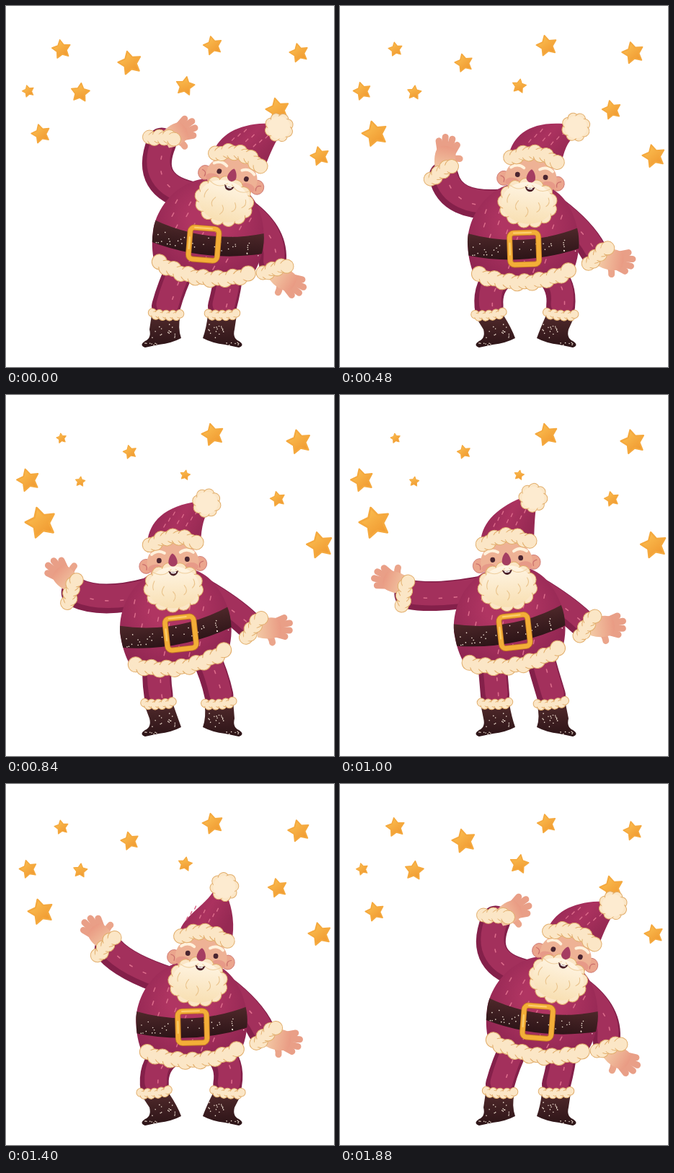
Recreate the animation shown at these times as an HTML page. Size 455 by 500 pixels, loop 1.92 s.

```html
<!DOCTYPE html>
<html lang="en">
<head>
<meta charset="utf-8">
<title>Waving Santa</title>
<style>
  html, body { margin: 0; width: 100%; height: 100%; overflow: hidden; background: #fff; }
  svg { display: block; width: 100%; height: 100%; }
</style>
</head>
<body>
<svg id="stage" viewBox="0 0 455 500" xmlns="http://www.w3.org/2000/svg">
  <defs>
    <linearGradient id="gold" x1="0" y1="0" x2=".5" y2="1">
      <stop offset="0" stop-color="#fcc355"/><stop offset="1" stop-color="#f19c33"/>
    </linearGradient>
    <radialGradient id="coat" cx=".5" cy=".42" r=".62">
      <stop offset=".3" stop-color="#b03562"/><stop offset="1" stop-color="#8f2551"/>
    </radialGradient>
    <linearGradient id="hatTone" x1="0" y1="0" x2="1" y2=".4">
      <stop offset="0" stop-color="#8f2551"/><stop offset=".6" stop-color="#ab325f"/><stop offset="1" stop-color="#962953"/>
    </linearGradient>
    <linearGradient id="skin" x1="0" y1="0" x2="1" y2="0">
      <stop offset="0" stop-color="#f3c9a4"/><stop offset="1" stop-color="#e99a83"/>
    </linearGradient>
    <linearGradient id="leather" x1="0" y1="0" x2="0" y2="1">
      <stop offset="0" stop-color="#50292b"/><stop offset="1" stop-color="#2c1417"/>
    </linearGradient>
    <linearGradient id="beardTone" x1="0" y1="0" x2="0" y2="1">
      <stop offset="0" stop-color="#fff5e4"/><stop offset="1" stop-color="#f8dfb2"/>
    </linearGradient>
  </defs>
</svg>
<script>
const LOOP = 1920, STEP = 40;
const TIMES = [0, 280, 680, 1000, 1200, 1600, 1880];
const CREAM = '#fbe6c6', FUR_EDGE = '#e2ae6c', COAT = '#a3305c', SHADE = '#84204a', FLECK = '#dc6c8b';
const stage = document.getElementById('stage');

function add(parent, tag, attrs = {}) {
  const node = document.createElementNS('http://www.w3.org/2000/svg', tag);
  set(node, attrs);
  parent.appendChild(node);
  return node;
}
function set(node, attrs) {
  for (const name in attrs) node.setAttribute(name, attrs[name]);
}
const group = parent => add(parent, 'g');
const shape = (parent, d, fill, extra) => add(parent, 'path', { d, fill, ...extra });
const line = (parent, d, stroke, width) =>
  add(parent, 'path', { d, fill: 'none', stroke, 'stroke-width': width, 'stroke-linecap': 'round' });
const oval = (parent, cx, cy, rx, ry, fill, extra) =>
  add(parent, 'ellipse', { cx, cy, rx, ry, fill, ...extra });
const place = (node, x, y, angle = 0) =>
  node.setAttribute('transform', `translate(${x} ${y}) rotate(${angle})`);

let seed = 7;
const random = () => (seed = seed * 16807 % 2147483647) / 2147483647;

// Periodic cubic curve through one value per key time; the loop closes on the first value.
function track(...values) {
  values.push(values[0]);
  const n = values.length;
  const at = i => TIMES[(i + n) % n] + LOOP * Math.floor(i / n);
  const val = i => values[(i + n) % n];
  const slope = i => (val(i + 1) - val(i)) / (at(i + 1) - at(i));
  const tangent = i => {
    const before = at(i) - at(i - 1), after = at(i + 1) - at(i);
    return (slope(i - 1) * after + slope(i) * before) / (before + after);
  };
  return t => {
    let i = n - 1;
    while (at(i) > t) i--;
    const h = at(i + 1) - at(i), u = (t - at(i)) / h, w = 1 - u;
    return val(i) * w * w * (1 + 2 * u) + val(i + 1) * u * u * (3 - 2 * u)
      + h * u * w * (tangent(i) * w - tangent(i + 1) * u);
  };
}

function turn(x, y, angle) {
  const a = angle * Math.PI / 180, c = Math.cos(a), s = Math.sin(a);
  return [x * c - y * s, x * s + y * c];
}

// Scalloped band along a quadratic curve.
function fur(parent, [x0, y0, cx, cy, x1, y1], count, r) {
  for (let i = 0; i < count; i++) {
    const u = i / (count - 1), w = 1 - u;
    add(parent, 'circle', {
      cx: w * w * x0 + 2 * u * w * cx + u * u * x1,
      cy: w * w * y0 + 2 * u * w * cy + u * u * y1 + (i % 2 ? 1.5 : -1.5),
      r, fill: CREAM, stroke: FUR_EDGE, 'stroke-width': 1
    });
  }
  line(parent, `M${x0} ${y0}Q${cx} ${cy} ${x1} ${y1}`, CREAM, r * .95);
}
// Scalloped blob around an ellipse.
function cloud(parent, x, y, rx, ry, count, r, fill) {
  for (let i = 0; i < count; i++) {
    const a = i / count * 2 * Math.PI + .2;
    add(parent, 'circle', { cx: x + rx * Math.cos(a), cy: y + ry * Math.sin(a), r, fill: CREAM, stroke: FUR_EDGE });
  }
  oval(parent, x, y, rx + r * .4, ry + r * .4, fill);
}
function specks(parent, count, x, y, w, h) {
  for (let i = 0; i < count; i++)
    oval(parent, x + w * random(), y + h * random(), .8, .8, '#f6e6d8');
}

function makeLimb(width) {
  const g = group(stage);
  const base = line(g, '', SHADE, width);
  const top = line(g, '', COAT, width - 9);
  const flecks = line(g, '', FLECK, 1.6);
  top.setAttribute('transform', 'translate(2 -3)');
  set(flecks, { 'stroke-dasharray': '4 17', transform: 'translate(5 3)' });
  return d => [base, top, flecks].forEach(p => p.setAttribute('d', d));
}
function makeHand() {
  const g = group(stage);
  const fingers = [[13, -13], [20, -5], [19, 5], [12, 13]];
  for (const [x, y] of fingers) line(g, `M-6 ${y * .5}L${x} ${y}`, '#e99f87', 9);
  line(g, 'M-12 6Q-6 14-6 20', '#eba58b', 9);
  shape(g, 'M-26-11Q-6-18 5-12Q11 0 5 12Q-10 17-26 11Z', 'url(#skin)');
  return g;
}
function makeCuff() {
  const g = group(stage);
  fur(g, [-17, 0, 0, -2, 17, 0], 6, 9.5);
  return g;
}

// Stars: x, y, tilt, radius at the right pose, radius at the left pose.
const stars = [
  [77, 60, -10, 14, 7.5], [172, 79, -14, 17.5, 10], [287, 55, -14, 14, 16.5], [406.5, 65, -14, 14, 18],
  [31, 118, -16, 9, 17], [103, 120, 6, 14, 7.5], [248.5, 111, 10, 14, 7.5], [377, 144, -14, 17.5, 11],
  [48.5, 177, -16, 14, 23], [435.5, 208, -14, 14, 19.5]
].map(([x, y, tilt, from, to]) => {
  const points = Array.from({ length: 10 }, (_, i) => turn(0, i % 2 ? -.5 : -.95, i * 36));
  const node = add(stage, 'polygon', {
    points: points.join(' '), fill: 'url(#gold)', stroke: '#f5a93e', 'stroke-width': .12, 'stroke-linejoin': 'round'
  });
  return p => node.setAttribute('transform',
    `translate(${x} ${y}) rotate(${tilt}) scale(${from + (to - from) * p})`);
});

// Arms
const waveArm = makeLimb(41), waveHand = makeHand(), waveCuff = makeCuff();
const restArm = makeLimb(38), restHand = makeHand(), restCuff = makeCuff();

// Legs and boots
function makeLeg(mirrored) {
  const limb = makeLimb(40);
  const foot = group(stage);
  if (mirrored) foot.setAttribute('transform', 'translate(516 0) scale(-1 1)');
  const boot = shape(foot, '', 'url(#leather)');
  specks(foot, 16, 203, 440, 34, 21);
  specks(foot, 7, 192, 466, 18, 4);
  const cuff = group(stage);
  fur(cuff, [-19, 0, 0, 3, 19, 0], 9, 5.8);
  return (hipX, hipY, x, bend, tilt) => {
    limb(`M${hipX} ${hipY}Q${(x + hipX) / 2 + bend} 388 ${x} 416`);
    const bx = mirrored ? 516 - x : x;
    boot.setAttribute('d', `M${bx - 20} 428L${bx + 20} 428Q238 446 243 460Q230 467 212 469L193 473`
      + `Q184 470 193 464Q202 460 199 448Z`);
    place(cuff, x, 427, tilt);
  };
}
const leftLeg = makeLeg(false), rightLeg = makeLeg(true);

// Torso, with its origin in the middle of the belt
const torso = group(stage);
const TORSO = 'M-38-70C-62-55-78-25-78 2C-78 22-74 36-70 46Q0 70 66 46C74 30 78 10 76-8C72-40 58-62 40-72C15-85-15-85-38-70Z';
shape(add(torso, 'clipPath', { id: 'torsoClip' }), TORSO, '#000');
shape(torso, TORSO, 'url(#coat)');
for (let i = 0; i < 34; i++) {
  const a = i * 2.4, r = Math.sqrt((i + .5) / 34);
  const x = 66 * r * Math.cos(a), y = -8 + 54 * r * Math.sin(a);
  line(torso, `M${x} ${y}l2-5`, FLECK, 1.5);
}
const belt = group(torso);
belt.setAttribute('clip-path', 'url(#torsoClip)');
shape(belt, 'M-80-15Q0 12 80-16L80 13Q0 36-80 16Z', 'url(#leather)');
specks(belt, 34, -72, 1, 144, 17);
const buckle = group(torso);
const frame = { x: -20, y: -22, width: 40, height: 44, rx: 6, fill: 'none' };
add(buckle, 'rect', { ...frame, stroke: '#c37a22', 'stroke-width': 8 });
add(buckle, 'rect', { ...frame, stroke: '#f3ae38', 'stroke-width': 6.2 });
line(buckle, 'M-14-22L10-22M-20-8L-20 8', '#fcd06f', 2);
fur(torso, [-64, 44, -1, 70, 60, 45], 13, 10.5);

// Head, with its origin between the ears
const head = group(stage);
const hat = shape(head, '', 'url(#hatTone)');
const hatFlecks = group(head);
for (let i = 0; i < 8; i++)
  line(hatFlecks, `M${-16 + i * 6.2} ${-50 - (i * 7 % 5) * 4}l2-4`, FLECK, 1.4);
for (const side of [-1, 1]) {
  oval(head, side * 37.5, 3, 9.5, 10, '#eba58d', { stroke: '#c96f6c', 'stroke-width': .8 });
  line(head, `M${side * 42} 0q${side * -7} 1 ${side * -5} 8`, '#c96f6c', 1.2);
}
oval(head, 0, -1, 36, 28, '#eeb295');
oval(head, -25, 7, 10, 6, '#e79a88');
oval(head, 25, 7, 10, 6, '#e79a88');
for (const side of [-1, 1]) line(head, `M${side * 11}-14q${side * 9}-6 ${side * 18} 1`, '#fff1dc', 4);
const openEyes = group(head), shutEyes = group(head);
for (const x of [-19, 20]) {
  oval(openEyes, x, -4, 3.4, 3.6, '#4a2530');
  line(shutEyes, `M${x - 4}-3q4-5 8 0`, '#4a2530', 2.2);
}
fur(head, [-31, -25, 2, -47, 34, -25], 9, 10);
cloud(head, -1, 34, 32, 25, 13, 9.5, 'url(#beardTone)');
for (const side of [-1, 1]) {
  line(head, `M${side * 3} 9q${side * 12} 12 ${side * 26} 2`, '#efcf9f', 1);
  line(head, `M${side * 14} 32q${side * 6} 8-1 13M${side * 27} 24q${side * 4} 7-2 12`, '#eac48d', 1.1);
}
line(head, 'M-2 40q6 6 0 13', '#eac48d', 1.1);
shape(head, 'M-7 11Q0 15 7 11Q5 18 0 18Q-5 18-7 11Z', '#4a2028');
line(head, 'M-3 13.5Q0 15 3 13.5', '#fff', 1.6);
shape(head, 'M0-13C4-11 7-3 6 1Q4 5 0 5Q-4 5-6 1C-7-3-4-11 0-13Z', '#a53d62');
const pompom = group(head);
cloud(pompom, 0, 0, 12.5, 12.5, 8, 7.5, '#fdebd0');

const pose = {
  x: track(281.5, 270, 241, 235.5, 245, 271),
  y: track(320, 324, 325, 318, 325, 324),
  lean: track(7, 3, -8, -9.8, -7.2, 3),
  headX: track(313, 291, 241, 231, 247, 294),
  headY: track(238, 241, 236, 231, 237, 241),
  headTilt: track(16, 12, 0, -4, -.5, 12),
  hatTip: track(44, 50, 56, 43, 30, 23),
  elbowX: track(191, 169, 141, 131, 144, 184),
  elbowY: track(250, 264, 291, 283, 262, 252),
  waveX: track(216, 181, 104, 90, 105, 177),
  waveY: track(183, 203, 258, 275, 253, 200),
  waveTilt: track(0, -14, -59, -80, -70, -28),
  handX: track(243, 200, 98, 68, 82, 180),
  handY: track(174, 180, 228, 256, 240, 172),
  handTilt: track(-30, -60, -103, -160, -158, -90),
  restX: track(373, 368, 348, 343, 351, 369),
  restY: track(365, 360, 331, 320, 333, 361),
  restTilt: track(-20, -33, -53, -57, -52, -33),
  restBend: track(22, 12, 6, 4, 6, 13),
  restHandX: track(393, 392, 378, 373, 380, 392),
  restHandY: track(383, 372, 333, 320, 336, 373),
  leftFoot: track(222, 211, 206, 215, 206, 211),
  rightFoot: track(300, 308, 301, 293, 302, 308)
};

function draw(t) {
  const p = {};
  for (const name in pose) p[name] = pose[name](t);
  const onTorso = (x, y) => {
    const [dx, dy] = turn(x, y, p.lean);
    return [p.x + dx, p.y + dy];
  };

  const swing = (1 - Math.cos(2 * Math.PI * (t + STEP / 2) / LOOP)) / 2;
  stars.forEach(update => update(swing));

  const [inX, inY] = turn(0, 6, p.waveTilt);
  waveArm(`M${onTorso(-28, -53)}Q${p.elbowX} ${p.elbowY} ${p.waveX + inX} ${p.waveY + inY}`);
  place(waveHand, p.handX, p.handY, p.handTilt);
  place(waveCuff, p.waveX, p.waveY, p.waveTilt);

  const [sx, sy] = onTorso(45, -41);
  const bendX = (sx + p.restX) / 2 + p.restBend, bendY = (sy + p.restY) / 2 - p.restBend * .4;
  const [backX, backY] = turn(0, -10, p.restTilt);
  restArm(`M${sx} ${sy}Q${bendX} ${bendY} ${p.restX + backX} ${p.restY + backY}`);
  place(restHand, p.restHandX, p.restHandY, p.restTilt + 52);
  place(restCuff, p.restX, p.restY, p.restTilt);

  // Knees push outwards as the torso sinks.
  const knee = (p.y - 318) * 1.5;
  leftLeg(...onTorso(-33, 45), p.leftFoot, -knee, (p.leftFoot - 217) * .5);
  rightLeg(...onTorso(33, 45), p.rightFoot, knee, (p.rightFoot - 301) * .8);

  place(torso, p.x, p.y, p.lean);
  place(buckle, -1.5 - .65 * p.lean, 10.5, -.35 * p.lean);

  place(head, p.headX, p.headY, p.headTilt);
  const tipX = p.hatTip, tipY = -116 + .7 * tipX;
  hat.setAttribute('d', `M-34-30C-30-58 ${10 - .35 * tipX} ${-65.5 - .285 * tipX} ${tipX - 10} ${tipY - 3}`
    + `L${tipX + 4} ${tipY + 10}Q43-60 40-26Z`);
  hatFlecks.setAttribute('transform', `skewX(${(40 - tipX) * .5}) translate(${(tipX - 40) * .1} 0)`);
  place(pompom, tipX, tipY, tipX);

  const blink = t >= 200 && t <= 360;
  openEyes.setAttribute('opacity', blink ? 0 : 1);
  shutEyes.setAttribute('opacity', blink ? 1 : 0);
}

const start = performance.now();
function tick() {
  const elapsed = (performance.now() - start) % LOOP;
  draw(Math.floor(elapsed / STEP) * STEP);
  requestAnimationFrame(tick);
}
tick();
</script>
</body>
</html>
```
